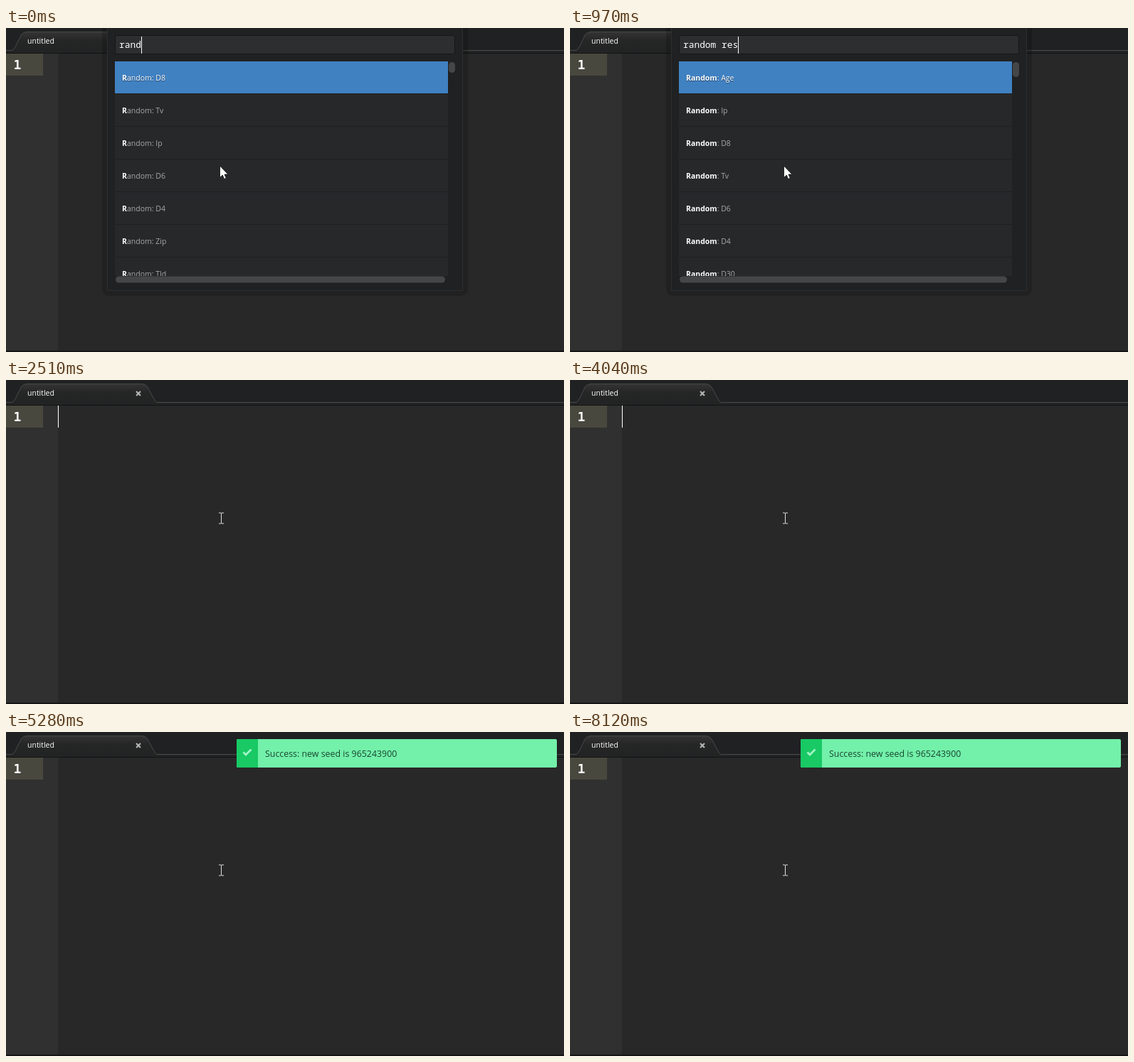
Write an HTML page that moves like this. It is 784 by 456 pixels and loops after 8220 ms.

```html
<!DOCTYPE html>
<html lang="en">
<head>
<meta charset="utf-8">
<title>Reseed command</title>
<style>
  html, body { margin: 0; width: 100%; height: 100%; overflow: hidden; background: #282828; }
  svg { display: block; width: 100vw; height: 100vh; }
  text { white-space: pre; }
  .ui { font: 10.5px "Open Sans", "Noto Sans", sans-serif; fill: #fff; }
  .mono { font: 500 12.87px "Noto Sans Mono", "DejaVu Sans Mono", monospace; fill: #fff; }
  .rest { fill: #a9a9a9; }
  .bold { font-weight: 700; fill: #fff; }
  .picked { text-shadow: 0 1px 1px #0008; }
  .picked .rest { fill: #fff; }
</style>
</head>
<body>
<svg viewBox="0 0 784 456">
  <defs>
    <linearGradient id="tabFill" x2="0" y2="1">
      <stop offset="0" stop-color="#343434"/>
      <stop offset=".45" stop-color="#262626"/>
      <stop offset="1" stop-color="#222324"/>
    </linearGradient>
    <clipPath id="listClip"><rect x="153" y="47" width="478" height="302"/></clipPath>
  </defs>

  <rect width="784" height="456" fill="#282828"/>
  <rect y="36" width="73" height="418" fill="#303030"/>
  <rect y="36" width="52" height="31" fill="#49483e"/>
  <text x="10.5" y="58" style="font:700 18px 'DejaVu Sans Mono',monospace" fill="#fff" id="lineNo">1</text>
  <rect y="454" width="784" height="2" fill="#141516"/>

  <rect width="784" height="32" fill="#202122"/>
  <rect y="32" width="784" height="3" fill="#232424"/>
  <rect y="35" width="784" height="1" fill="#101112"/>
  <path d="M0 31.5H8Q11 31 13 27L21 10Q24 5.500 29 5.500H191Q196 5.500 199 10L207 25Q210 31.500 213 31.500H784"
        fill="url(#tabFill)" stroke="#484848"/>
  <text class="ui" x="30" y="22">untitled</text>
  <path d="M183 16l6 6m0-6l-6 6" stroke="#b4b4b4" stroke-width="2.2"/>
  <rect id="caret" x="73" y="36" width="1" height="31" fill="#fff"/>

  <g id="palette">
    <rect id="halo" x="135" y="-20" width="514" rx="9" fill="#000" fill-opacity=".19"/>
    <rect id="frame" x="142.5" y="-20.500" width="499" fill="#202122" stroke="#2d2e2f"/>
    <rect x="153.500" y="10.500" width="477" height="26" rx="3" fill="#2d2e30" stroke="#151617"/>
    <text id="query" class="mono" x="159" y="28"></text>
    <rect id="queryCaret" y="12" width="1" height="24" fill="#fff"/>
    <g id="list" clip-path="url(#listClip)"></g>
    <g id="bars" fill="#454647">
      <rect id="vBar" x="622" y="48" width="9" rx="4.500"/>
      <rect id="hBar" x="154" y="349.500" height="9" rx="4.500"/>
    </g>
  </g>

  <g id="notice">
    <rect x="324" y="10" width="450" height="40" rx="2" fill="#73f0aa"/>
    <path d="M326 10H354V50H326Q324 50 324 48V12Q324 10 326 10Z" fill="#18c964"/>
    <path d="M333.500 28.500l3.500 3.500 7.500-7.500" fill="none" stroke="#a0f5c6" stroke-width="2.800"/>
    <text x="364" y="35" style="font:12.4px 'Open Sans','Noto Sans',sans-serif" fill="#17462e">Success: new seed is 965243900</text>
  </g>

  <path id="arrow" d="M300.500 194V210.500L304.300 207 306.600 212.500 309.300 211.300 307 206H312Z" fill="#fff" stroke="#111" stroke-width=".8"/>
  <path id="beam" d="M-3.500-7.500H-1Q0-7.500 0-6.500Q0-7.500 1-7.500H3.500M0-7V7M-3.500 7.500H-1Q0 7.500 0 6.500Q0 7.500 1 7.500H3.500"
        fill="none" stroke="#e2e2e2"/>
</svg>
<script>
const LOOP = 8220, CLOSE = 1730, PHRASE = "random reseed";
const KEYS = [280, 420, 550, 690, 820, 970, 1120, 1270, 1420];
const BLINKS = [1730, 2110, 2510, 2940, 3370, 3640, 4040, 4320, 4870, 5280,
                5710, 6110, 6410, 6810, 7210, 7620, 7990, 8120];
const LISTS = [
  { at: 0, bold: 1, names: ["D8", "Tv", "Ip", "D6", "D4", "Zip", "Tld"], vBar: 15, hBar: 463 },
  { at: 420, bold: 6, names: ["Age", "Ip", "D8", "Tv", "D6", "D4", "D30"], vBar: 21, hBar: 460 },
  { at: 1120, bold: 14, names: ["Reseed"] }
];
const BEAM = [[0, 302.5, 194.5], [6950, 390, 250], [7080, 570, 370], [7210, 710, 446],
              [7350, 732, 450], [7480, 520, 330], [7620, 302.5, 194.5]];

const $ = id => document.getElementById(id);
const set = (id, attrs) => {
  for (const k in attrs) $(id).setAttribute(k, attrs[k]);
};
const show = (id, on) => set(id, { visibility: on ? "visible" : "hidden" });
const passed = (times, t) => times.filter(x => x <= t).length;

function row(name, i, bold, width) {
  const label = "Random: " + name, y = 47 + 46 * i;
  return `<rect x="153" y="${y}" width="${width}" height="45" fill="${i ? "#27282a" : "#4081c2"}"/>
    <rect x="153" y="${y + 45}" width="${width}" height="1" fill="#1e1f20"/>
    <text class="ui${i ? "" : " picked"}" x="163" y="${y + 27}"><tspan class="bold">${label.slice(0, bold)}</tspan><tspan class="rest">${label.slice(bold)}</tspan></text>`;
}

let shown;
function drawList(list) {
  if (list === shown) return;
  shown = list;
  const long = list.names.length > 1;
  const bottom = long ? 370 : 104;
  $("list").innerHTML = list.names.map((n, i) => row(n, i, list.bold, long ? 468 : 478)).join("");
  set("frame", { height: bottom + 20 });
  set("halo", { height: bottom + 27 });
  set("bars", { display: long ? "inline" : "none" });
  if (long) {
    set("vBar", { height: list.vBar });
    set("hBar", { width: list.hBar });
  }
}

function draw(t) {
  const open = t < CLOSE;
  set("palette", { display: open ? "inline" : "none" });
  if (open) {
    const typed = PHRASE.slice(0, 4 + passed(KEYS, t));
    $("query").textContent = typed;
    set("queryCaret", { x: Math.round(159 + typed.length * 7.72) });
    drawList(LISTS.findLast(l => l.at <= t));
  }

  show("caret", passed(BLINKS, t) % 2);

  const entering = t < 4440;
  show("notice", t >= 4320);
  set("notice", {
    opacity: entering ? 0.8 : 1,
    transform: entering ? "translate(549 30) scale(1.004 1.08) translate(-549 -30)" : ""
  });

  const overList = t < 1120;
  show("arrow", overList);
  show("beam", !overList);
  const [, x, y] = BEAM.findLast(b => b[0] <= t);
  set("beam", { transform: `translate(${x} ${y})` });
}

const start = performance.now();
function tick() {
  draw((performance.now() - start) % LOOP);
  requestAnimationFrame(tick);
}
tick();
</script>
</body>
</html>
```
